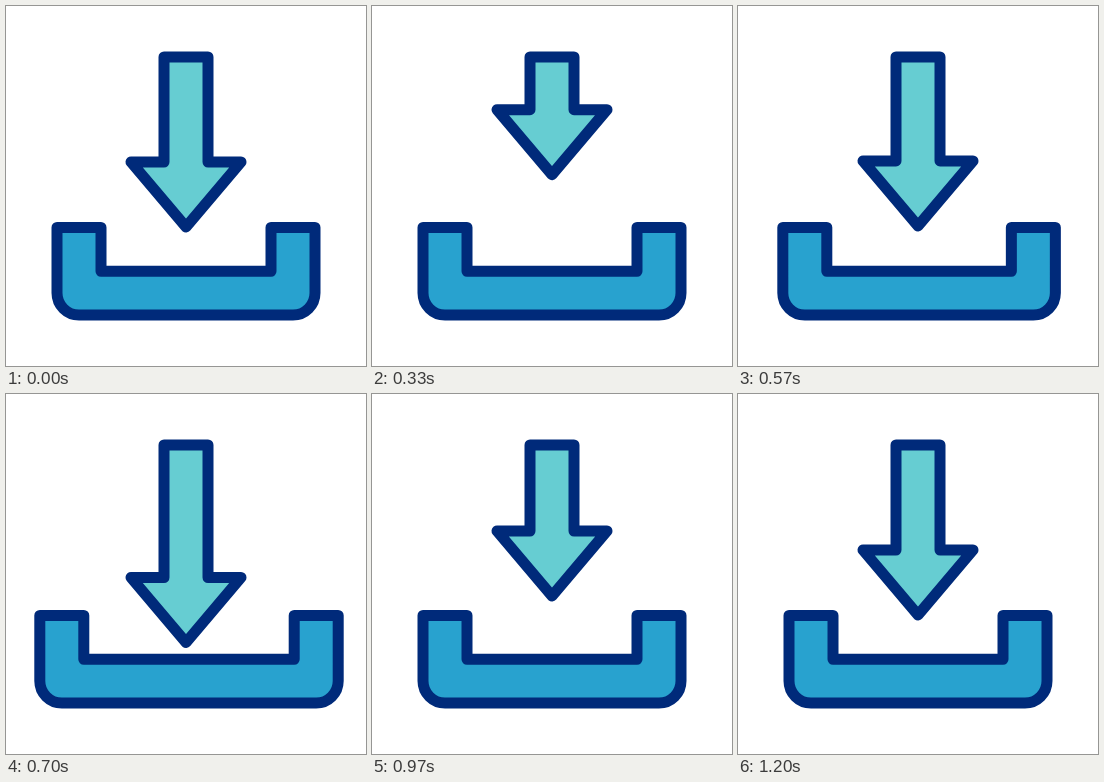
Write an HTML page that moves like this. It is 360 px wide and 360 px high and loops after 1500 ms.

```html
<!DOCTYPE html>
<html lang="en">
<head>
<meta charset="utf-8">
<title>Download</title>
<style>
  html, body { margin: 0; width: 100%; height: 100%; overflow: hidden; background: #fff; }
  svg { display: block; width: 100vw; height: 100vh; }
  path { stroke: #002a7a; stroke-width: 11; stroke-linejoin: round; stroke-linecap: round; }
</style>
</head>
<body>
<svg viewBox="0 0 360 360">
  <path id="tray" fill="#28a2cf"/>
  <path id="arrow" fill="#66cdd2"/>
</svg>
<script>
const LOOP = 1500;
const tray = document.getElementById('tray');
const arrow = document.getElementById('arrow');

// Arrowhead offset: [step, pixels], eased between keys
const keys = [[0, 0], [11, -53.6], [21, 27.5], [29, -19], [36, 0]];

const ease = u => u * u * (3 - 2 * u);

function headOffset(k) {
  for (let i = 1; i < keys.length; i++) {
    const [a, from] = keys[i - 1], [b, to] = keys[i];
    if (k <= b) return from + (to - from) * ease((k - a) / (b - a));
  }
  return 0;
}

function draw(ms) {
  // 30 steps per second on a 10 ms clock, then a rest
  const k = Math.min(36, Math.floor((Math.floor(ms / 10) + 0.5) * 0.3));

  const y = 156 + headOffset(k);
  arrow.setAttribute('d',
    `M158 51H202V${y}H235L180 ${y + 65}L125 ${y}H158Z`);

  // The tray walls are pushed apart, the right one further
  const push = Math.max(0, 1 - Math.abs(k - 21) / 6.25);
  const l = 51 - 17.2 * push, r = 309 + 23.2 * push;
  tray.setAttribute('d',
    `M${l} 221.5H${l + 44}V265.3H${r - 44}V221.5H${r}V287` +
    `A22 22 0 0 1 ${r - 22} 309H${l + 22}A22 22 0 0 1 ${l} 287Z`);
}

let start;
function tick(now) {
  if (start === undefined) start = now;
  draw(Math.max(0, now - start) % LOOP);
  requestAnimationFrame(tick);
}
draw(0);
requestAnimationFrame(tick);
</script>
</body>
</html>
```
